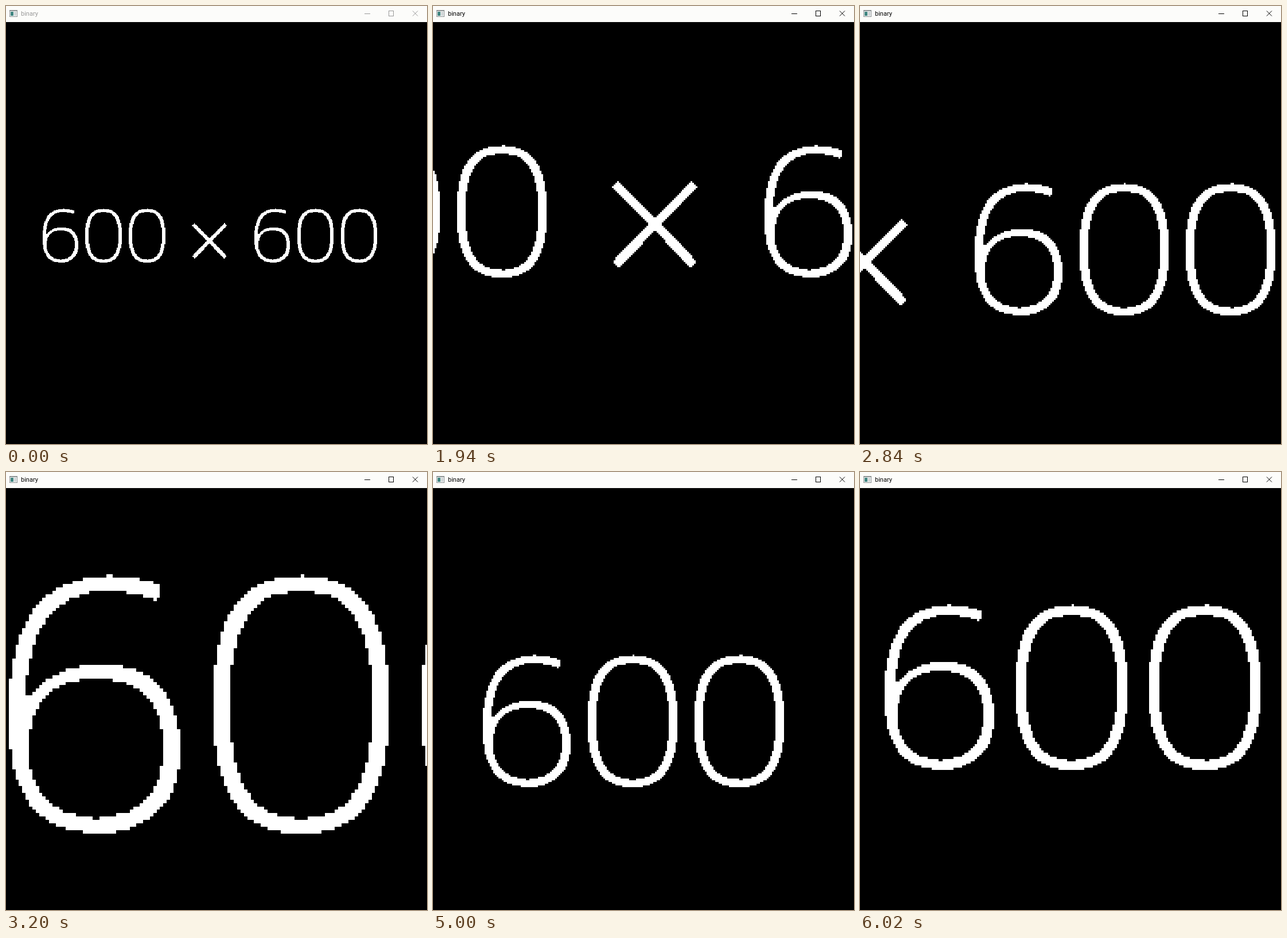
An HTML page with a canvas that plays this animation: 734 by 763 pixels, repeating every 8000 ms.

```html
<!DOCTYPE html>
<html lang="en">
<head>
<meta charset="utf-8">
<title>binary</title>
<style>
  html, body { margin: 0; width: 100%; height: 100%; overflow: hidden; background: #000; }
  #bar { position: absolute; left: 0; top: 0; width: 734px; height: 28px; background: #fcfcfa; color: #000; }
  #bar.idle { color: #999; }
  #bar svg { position: absolute; left: 0; top: 0; }
  #bar span { position: absolute; left: 26px; top: 6px; font: 11px/15px Roboto, "Open Sans", sans-serif; }
  #view { position: absolute; left: 0; top: 28px; }
</style>
</head>
<body>
<div id="bar" class="idle">
  <svg width="734" height="28" fill="none" stroke="currentColor" shape-rendering="crispEdges">
    <g stroke="none">
      <path fill="#8d9394" d="M6 7h14v12H6z"/>
      <path fill="#f4f6f6" d="M7 9h12v9H7z"/>
      <path fill="#3f8580" d="M8 10h5v7H8z"/>
      <path fill="#cfd5d6" d="M14 10h4v7h-4z"/>
    </g>
    <path d="M625 13.5h10M667.5 8.5h8v9h-8z"/>
    <path d="M709 8.5l9 9M718 8.5l-9 9" shape-rendering="auto"/>
  </svg>
  <span>binary</span>
</div>
<canvas id="view" width="734" height="735"></canvas>
<script>
const LOOP = 8000, ACTIVE_AT = 1940, TOP = 265;
const bar = document.getElementById('bar');
const view = document.getElementById('view').getContext('2d');

// ---- the 600 x 600 black and white picture ----
const image = document.createElement('canvas');
image.width = image.height = 600;
const g = image.getContext('2d', { willReadFrequently: true });

function oval(path, cx, cy, a, b, n = 2.6) {
  const bend = v => Math.sign(v) * Math.abs(v) ** (2 / n);
  for (let i = 0; i < 240; i++) {
    const u = i / 120 * Math.PI;
    path.lineTo(cx + a * bend(Math.cos(u)), cy + b * bend(Math.sin(u)));
  }
  path.closePath();
}

function ink(x, draw) {
  g.save();
  g.translate(x, TOP);
  draw();
  g.restore();
}

const zero = new Path2D();
oval(zero, 26, 38.78, 26, 37.98);
zero.moveTo(47, 38.75);
oval(zero, 26, 38.75, 21, 33.5);

const six = new Path2D(`M45 2.9C40 1.4 35 .8 30 .8C10 .8 0 13 0 43C0 66 8.5 76.8 26.5 76.8
  C42 76.8 51 68 51 52C51 36 43 26.8 27.5 26.8C19 26.8 10.5 30.5 6 36.5L5 36
  C6 17 13 5 30 5C35 5 39 5.9 43 7.5L43 8L44 8L44 7L45 7Z`);
six.moveTo(46, 51.6);
oval(six, 26, 51.6, 20, 20.6, 2.3);

function drawSix(x) {
  ink(x, () => {
    g.fill(six, 'evenodd');
    g.fillRect(29, 0, 2, 1);
    g.clearRect(25, 72, 2, 1);
  });
}

function drawZero(x, tip, foot) {
  ink(x, () => {
    g.fill(zero, 'evenodd');
    g.fillRect(26, 0, tip, 1);
    g.clearRect(28 - foot, 72, foot, 1);
  });
}

function drawTimes(x) {
  ink(x, () => {
    g.lineWidth = 5.2;
    g.beginPath();
    g.moveTo(1.9, 22.8); g.lineTo(48.1, 69.8);
    g.moveTo(48.1, 22.8); g.lineTo(1.9, 69.8);
    g.stroke();
  });
}

g.fillRect(0, 0, 600, 600);
g.fillStyle = g.strokeStyle = '#fff';
for (const x of [52, 354]) {
  drawSix(x);
  drawZero(x + 61, 1, 4);
  drawZero(x + 123, 2, 2);
}
drawTimes(265);

const bits = g.getImageData(0, 0, 600, 600);
for (let i = 0; i < bits.data.length; i += 4) {
  bits.data.fill(bits.data[i] > 127 ? 255 : 0, i, i + 3);
  bits.data[i + 3] = 255;
}
g.putImageData(bits, 0, 0);

// ---- the visible square of the picture over time ----
const SIZES = [600, 480, 384, 306, 245, 196, 156, 125.3];
const steps = [{ t: 0, x: 0, y: 0, n: 600 }];
const last = () => steps[steps.length - 1];

// wheel zoom that keeps the point under the pointer (fx, fy) in place
function zoom(fx, fy, ...moves) {
  for (const [t, level] of moves) {
    const v = last(), n = SIZES[level], d = v.n - n;
    steps.push(level ? { t, x: v.x + d * fx, y: v.y + d * fy, n } : { t, x: 0, y: 0, n });
  }
}

const smooth = k => k * k * (3 - 2 * k);
const linear = k => k;
const slow = k => k * (2 - k);

function pan(from, to, count, x, y, ease = linear) {
  const v = last();
  for (let i = 1; i <= count; i++) {
    const k = ease(i / count);
    const t = count > 1 ? from + (to - from) * (i - 1) / (count - 1) : from;
    steps.push({ t, x: v.x + (x - v.x) * k, y: v.y + (y - v.y) * k, n: v.n });
  }
}

zoom(.44, .551, [500, 1], [560, 2], [620, 3], [1040, 1], [1100, 0]);
zoom(.44, .547, [1340, 1], [1400, 3], [1460, 4]);
pan(1940, 2300, 7, 242.3, 182.3, smooth);
pan(2660, 2840, 4, 287.3, 171.7, smooth);
zoom(.5503, .566, [3020, 5], [3080, 6], [3200, 7]);
zoom(.5503, .56, [3620, 5], [3680, 3]);
pan(4460, 4460, 1, 263.6, 137);
pan(4520, 4760, 4, 294, 132.1);
zoom(.505, .592, [5000, 4], [5120, 5]);
pan(5600, 5600, 1, 345.75, 198.3);
pan(5660, 5780, 3, 340, 206);
pan(5840, 6020, 3, 342.5, 211.1, slow);

function frame() {
  const t = performance.now() % LOOP;
  const v = steps.findLast(s => s.t <= t);
  bar.className = t < ACTIVE_AT ? 'idle' : '';
  view.imageSmoothingEnabled = false;
  view.fillRect(0, 0, 734, 735);
  view.drawImage(image, v.x, v.y, v.n, v.n, 0, 0, 734, 735);
  requestAnimationFrame(frame);
}
frame();
</script>
</body>
</html>
```
